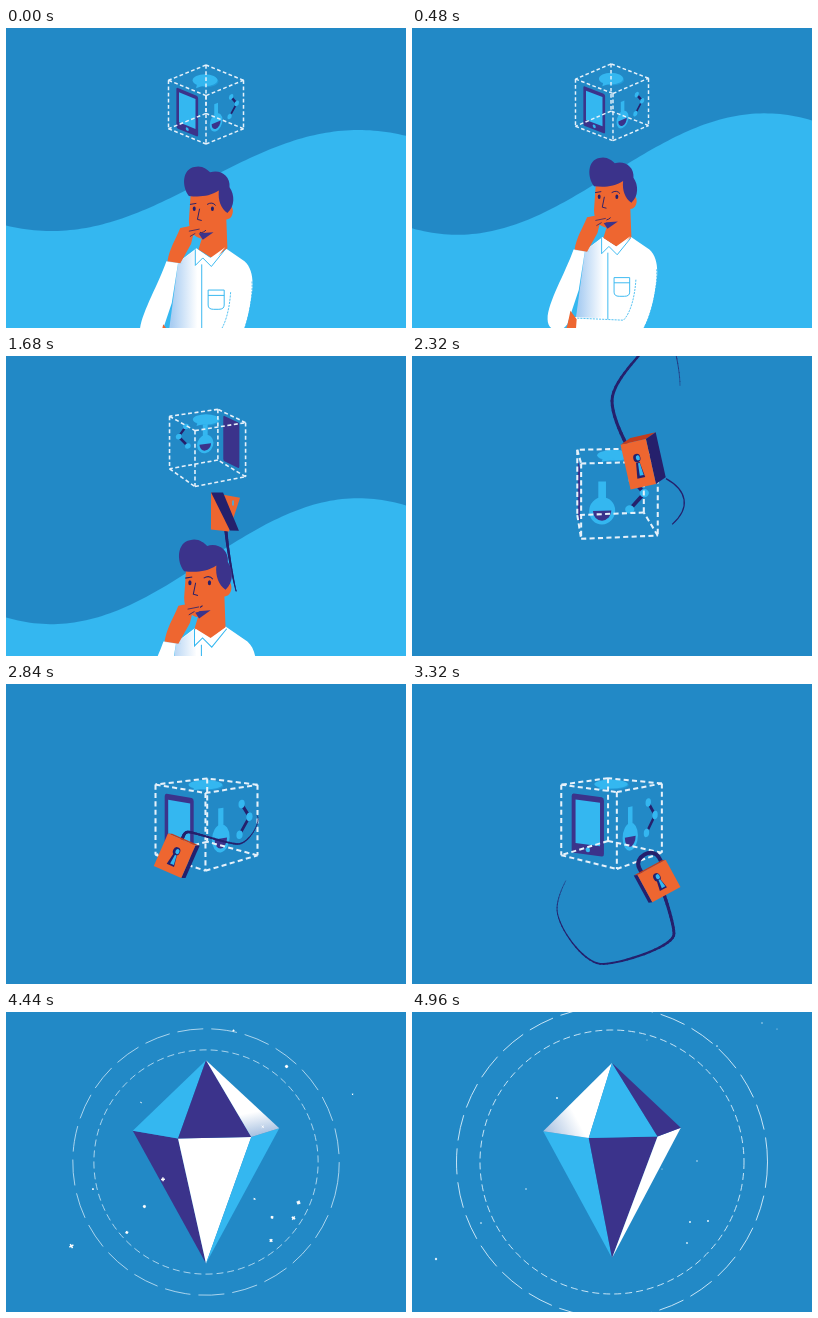
Animation of 400x300 px, one loop 5 s. Source, as an HTML page with a canvas:

```html
<!DOCTYPE html>
<html lang="en">
<head>
<meta charset="utf-8">
<title>Idea in a gem</title>
<style>
html, body { margin: 0; width: 100%; height: 100%; overflow: hidden; background: #2289c6; }
canvas { display: block; width: 400px; height: 300px; }
</style>
</head>
<body>
<canvas id="stage" width="400" height="300"></canvas>
<script>
const ctx = document.getElementById('stage').getContext('2d');
const LOOP = 5000, TAU = Math.PI * 2, RAD = Math.PI / 180;
const BLUE = '#2289c6', CYAN = '#34b7f0', VIOLET = '#3b338b', NAVY = '#25206c',
  ORANGE = '#ee6630', WHITE = '#fff';

// Monotone cubic interpolation through rows of [time, ...values].
function track(t, keys) {
  const last = keys.length - 1;
  if (t <= keys[0][0]) return keys[0].slice(1);
  if (t >= keys[last][0]) return keys[last].slice(1);
  let i = 0;
  while (keys[i + 1][0] < t) i++;
  const slope = (j, c) => (keys[j + 1][c] - keys[j][c]) / (keys[j + 1][0] - keys[j][0]);
  const tangent = (j, c) => {
    if (j === 0 || j === last) return 0;
    const a = slope(j - 1, c), b = slope(j, c);
    return a * b <= 0 ? 0 : 2 * a * b / (a + b);
  };
  const [a, b] = [keys[i], keys[i + 1]], d = b[0] - a[0], u = (t - a[0]) / d, v = 1 - u;
  return a.slice(1).map((p, n) => {
    const c = n + 1;
    return p * (1 + 2 * u) * v * v + tangent(i, c) * d * u * v * v
      + b[c] * u * u * (3 - 2 * u) - tangent(i + 1, c) * d * u * u * v;
  });
}

function poly(points, fill) {
  ctx.beginPath();
  points.forEach(p => ctx.lineTo(p[0], p[1]));
  ctx.closePath();
  ctx.fillStyle = fill;
  ctx.fill();
}
function line(points, color, width) {
  ctx.beginPath();
  points.forEach(p => ctx.lineTo(p[0], p[1]));
  ctx.strokeStyle = color;
  ctx.lineWidth = width;
  ctx.stroke();
}
function ellipse(x, y, rx, ry, fill, from = 0, to = TAU) {
  ctx.beginPath();
  ctx.ellipse(x, y, rx, ry, 0, from, to);
  ctx.fillStyle = fill;
  ctx.fill();
}
function shape(d, fill) {
  ctx.fillStyle = fill;
  ctx.fill(new Path2D(d));
}
function outline(d, color, width, dash = []) {
  ctx.setLineDash(dash);
  ctx.strokeStyle = color;
  ctx.lineWidth = width;
  ctx.stroke(new Path2D(d));
  ctx.setLineDash([]);
}

function wave(t) {
  const [mid, amp] = track(t, [[0, 152.5, 50.5], [1040, 138, 73.5], [1680, 205, 63], [2060, 400, 50]]);
  const points = [[0, 300]];
  for (let x = 0; x <= 400; x += 4) points.push([x, mid - amp * Math.sin((x - 199) * Math.PI / 307)]);
  poly([...points, [400, 300]], CYAN);
}

function man(t) {
  const [zoom, top, tilt, look] = track(t, [
    [0, 1.07, 139, 3, 4], [1040, 1, 119, 0, 0], [1680, 1.15, 184, 0, 2], [2060, 1.25, 350, 0, 2]]);
  ctx.save();
  ctx.translate(200, top);
  ctx.scale(zoom, zoom);
  ctx.translate(-200, -119);

  // Shirt and folded arm
  shape('M174 208L191 195L204 204L217 194L236 207C244 214 245 228 242 243C238 270 229 297 210 298L174 300Z', WHITE);
  const shade = ctx.createLinearGradient(168, 0, 192, 0);
  shade.addColorStop(0, '#a9cdf2');
  shade.addColorStop(1, WHITE);
  shape('M174 208L191 196L193 272L165 275Z', shade);
  shape('M164 272L212 274L224 240L242 240C238 270 228 299 206 298L163 287Z', WHITE);
  outline('M223 236C222 252 218 268 211 275L166 273M243 226C244 246 238 268 231 282', CYAN, .8, [2, 1]);
  outline('M196 210V274M202 234H217V248Q217 252 212 252H207Q202 252 202 248ZM202 239H217', CYAN, .9);

  // Head
  ctx.save();
  ctx.translate(tilt, 0);
  shape('M183 140L181 169C181 180 187 185 193 186L190 196L204 205L217 195L216 168C223 168 224 156 219 155L212 138Z', ORANGE);
  shape('M190 181L204 180L194 187Z', VIOLET);
  shape('M181 146C174 137 175 121 186 119C193 117 198 121 201 124C210 121 220 127 219 138C224 145 224 156 217 162C211 158 208 150 209 141C200 147 190 147 181 146Z', VIOLET);
  ctx.translate(0, look);
  outline('M191 154L189 164L193 165M182 150L188 149M198 150Q203 147 206 151M189 175Q193 178 197 174', NAVY, .9);
  const open = t < 700 || t > 1250;
  [[186, 154], [203, 154]].forEach(([x, y]) => ellipse(x, y, 1.4, open ? 2.2 : .6, NAVY));
  ctx.restore();

  shape('M191 196L189 212L196 204L203 212L218 194L204 204Z', WHITE);
  outline('M190 196L190 211L197 204L205 212L218 196', CYAN, .9);

  // Raised arm
  shape('M163 207C155 230 138 258 138 274C138 286 151 288 157 279L168 246L174 208Z', WHITE);
  outline('M164 207L178 209', '#b9dcf5', 1);
  shape('M157 280L160 266L166 274L165 288L155 286Z', ORANGE);
  shape('M176 176L186 174L195 177L194 181L188 183L186 191L176 209L164 207C166 195 171 188 176 176Z', ORANGE);
  outline('M184 179L194 177M185 184L190 181', NAVY, .7);
  ctx.restore();
}

const CUBE = [
  // time, x, y, radius, yaw, pitch, perspective
  [0, 200, 76.5, 37.5, 0, .42, 0], [1040, 200, 71.5, 35.3, 7, .41, 0],
  [1680, 201, 90, 39.7, 163, .32, .0013], [2320, 203, 134, 51, 322, .26, .002],
  [3000, 200, 136, 51, 363, .21, .002], [3320, 200, 135, 50.5, 365, .21, .002],
  [3920, 200, 142, 42.5, 366, .33, .001]];

function cube(t) {
  const [cx, cy, r, yaw, pitch, depth] = track(t, CUBE);
  const half = r / Math.SQRT2;
  const project = (angle, y, reach = r) => {
    const a = angle * RAD, z = reach * Math.cos(a), p = 1 + z * depth;
    return [cx + reach * Math.sin(a) * p, cy + (y * Math.cos(pitch) + z * Math.sin(pitch)) * p];
  };
  const corner = (i, y) => project(yaw + i * 90, y);
  ctx.globalAlpha = 1 - .5 * Math.min(1, Math.max(0, (t - 3700) / 200));

  // Draws in face coordinates running from -50 to 50.
  const onFace = (i, draw) => {
    const o = project(yaw + i * 90 + 45, 0, half);
    const [a, b, c] = [corner(i, -half), corner(i + 1, -half), corner(i, half)];
    ctx.save();
    ctx.transform((b[0] - a[0]) / 100, (b[1] - a[1]) / 100, (c[0] - a[0]) / 100, (c[1] - a[1]) / 100, o[0], o[1]);
    draw(Math.cos((yaw + i * 90 + 45) * RAD));
    ctx.restore();
  };
  const phone = facing => {
    shape('M-25 -42H25Q29 -42 29 -38V38Q29 42 25 42H-25Q-29 42 -29 38V-38Q-29 -42 -25 -42Z', VIOLET);
    if (facing < .2) return;
    shape('M-22 -34H22V28H-22Z', CYAN);
    ellipse(0, 35, 4, 3.5, CYAN);
  };
  const lab = () => {
    shape('M-28 -25H-18V4H-28Z', CYAN);
    ellipse(-23, 14, 17, 18, CYAN);
    ellipse(-23, 14, 12, 13, VIOLET, 0, Math.PI);
    line([[17, -26], [32, -8], [13, 13]], NAVY, 5);
    [[17, -26], [32, -8], [13, 13]].forEach(([x, y]) => ellipse(x, y, 6, 5.5, CYAN));
  };
  const bubble = () => {
    const [x, y] = project(0, -half, 0), w = r * .33, h = w * Math.sin(pitch) + 1;
    ellipse(x, y + 1, w, h, '#239bd9');
    ellipse(x - 1, y, w, h, CYAN);
    poly([[x - w * .7, y + h * .4], [x - w * .8, y + h * 1.3], [x, y + h * .7]], CYAN);
  };
  const edges = () => {
    ctx.setLineDash([r * .1, r * .065]);
    for (let i = 0; i < 4; i++) {
      [-half, half].forEach(y => line([corner(i, y), corner(i + 1, y)], '#e6f1fa', r * .04));
      line([corner(i, -half), corner(i, half)], '#e6f1fa', r * .04);
    }
    ctx.setLineDash([]);
  };
  bubble();
  onFace(-1, phone);
  onFace(0, lab);
  edges();
  ctx.globalAlpha = 1;
}

const FLIGHT = [
  [1440, 230, 235], [1680, 219, 156], [1800, 262, 90], [1900, 268, 30], [2020, 252, -30],
  [2150, 228, -2], [2230, 200, 45], [2320, 226, 108], [2440, 252, 135], [2560, 232, 160],
  [2700, 182, 148], [2820, 172, 166], [2960, 145, 225], [3080, 190, 280], [3200, 262, 250],
  [3320, 247, 197], [3480, 245, 195], [3760, 202, 165]];

function lock(t) {
  if (t < 1440 || t > 3980) return;
  const [x, y] = track(t, FLIGHT);
  const steps = 60, span = Math.min(420, t - 1440);
  if (t < 3740) {
    ctx.lineCap = 'round';
    for (let i = 0; i < steps; i++) {
      const at = n => track(Math.max(1440, Math.min(t - span * n / steps, 3320)), FLIGHT);
      line([at(i), at(i + 1)], NAVY, .4 + 3.2 * (1 - i / steps));
    }
    ctx.lineCap = 'butt';
  }
  const [rot, w, h, d] = track(t, [
    [1900, .3, 13, 20, 10], [2320, -.22, 13, 23, 11], [2800, .5, 15, 18, 5],
    [3080, -1, 15, 16, -4], [3320, -.5, 16, 15.5, -3.5], [3760, 0, 14, 14, -2]]);
  ctx.save();
  ctx.translate(x, y);
  if (t < 1860) {
    ctx.rotate((t - 1680) * .003);
    poly([[-14, -19], [15, -14], [4, 20], [-14, 18]], ORANGE);
    poly([[-14, -19], [-2, -19], [14, 19], [5, 19]], NAVY);
    line([[8, -11], [8, -6]], CYAN, 1.5);
    ctx.restore();
    return;
  }
  ctx.rotate(rot);
  if (t < 2700) outline('M24 20C42 36 42 54 20 66', NAVY, 1.2);
  if (t > 2900) outline(`M${-w * .7} ${-h}V${-h - 5}C${-w * .7} ${-h - 18} ${w * .7} ${-h - 18} ${w * .7} ${-h - 5}V${-h}`, NAVY, 4);
  const side = Math.sign(d) * w, lift = Math.abs(d) * .4;
  poly([[-w, -h], [w, -h], [w + d, -h - lift], [-w + d, -h - lift]], '#c23c1d');
  poly([[side, -h], [side + d, -h - lift], [side + d, h - lift], [side, h]], NAVY);
  poly([[-w, -h], [w, -h], [w, h], [-w, h]], ORANGE);
  ellipse(0, -h * .28, 3.6, 4.2, NAVY);
  poly([[-1.8, -2], [1.8, -2], [4, h * .6], [-4, h * .6]], NAVY);
  ellipse(1, -h * .28, 2, 2.6, CYAN);
  poly([[0, -1], [1.8, -1], [3, h * .5], [-1, h * .5]], CYAN);
  ctx.restore();
}

function gem(t, inside) {
  const [topY, lowY, r, stretch] = track(t, [
    [3440, -70, 390, 89, .955], [3920, 105, 118, 89, .955], [3990, 118, 118, 88, .96],
    [4500, 117.5, 117.5, 73, .99], [4960, 117.5, 117.5, 70, 1]]);
  const spin = t < 3920 ? track(t, [[3440, -60], [3920, 0]])[0]
    : 221 * (1 - Math.pow(1 - Math.min(1, (t - 3920) / 1080), 1.9));
  const rim = (i, y) => {
    const a = (spin + i * 60) * RAD;
    return [200 + r * Math.sin(a), y + r * .13 * Math.cos(a)];
  };
  const sides = [0, 1, 2, 3, 4, 5];
  const half = (y, tipY, colors) => sides.forEach(i => {
    const a = rim(i, y), b = rim(i + 1, y);
    const cross = (b[0] - a[0]) * (tipY - a[1]) - (b[1] - a[1]) * (tipY < y ? 200 - a[0] : a[0] - 200) * (tipY < y ? 1 : -1);
    if (tipY < y ? cross >= 0 : cross <= 0) return;
    let fill = colors[i % 3];
    if (fill === WHITE && tipY < y) {
      fill = ctx.createLinearGradient(a[0], a[1], (b[0] + 200) / 2, (b[1] + tipY) / 2);
      fill.addColorStop(0, '#a5bfe0');
      fill.addColorStop(.55, WHITE);
    }
    poly([a, b, [200, tipY]], fill);
  });
  if (t > 3440 && t < 4000) poly(sides.map(i => rim(i, lowY)), NAVY);
  inside();
  if (t < 3440) return;
  half(lowY, lowY + 1.836 * r * stretch, [WHITE, CYAN, VIOLET]);
  half(topY, topY - .95 * r * stretch, [VIOLET, WHITE, CYAN]);
}

function burst(t) {
  if (t < 3760 || t > 4140) return;
  const [inner, outer] = track(t, [[3760, 30, 30], [3920, 71, 116], [4140, 165, 165]]);
  for (let i = 0; i < 16; i++) {
    const a = i * TAU / 16, c = Math.cos(a), s = Math.sin(a);
    line([[200 + inner * c, 150 + inner * s], [200 + outer * c, 150 + outer * s]], '#d9ecf8', 1);
  }
}

function rings(t) {
  if (t < 4080) return;
  const [near, far, alpha] = track(t, [[4080, 50, 60, 0], [4500, 118, 140, .8], [4960, 132, 155.5, .9]]);
  const turn = (t - 4960) * .0003;
  ctx.globalAlpha = alpha;
  ctx.strokeStyle = '#d9eefa';
  ctx.lineWidth = 1;
  [[near, [7, 4], turn], [far, [26, 8], -turn]].forEach(([r, dash, start]) => {
    ctx.setLineDash(dash);
    ctx.beginPath();
    ctx.arc(200, 150, r, start, start + TAU);
    ctx.stroke();
  });
  ctx.setLineDash([]);
  ctx.globalAlpha = 1;
}

// Each spark drifts from one point to another: x, y, x, y, size.
const SPARKS = [
  [256, 75, 305, 34, 2.4], [289, 172, 296, 209, 3], [297, 202, 278, 210, 3], [255, 226, 275, 231, 2.6],
  [247, 262, 285, 149, 2.2], [107, 221, 24, 247, 3.4], [163, 212, 114, 177, 2.3], [173, 230, 69, 211, 2.2],
  [169, 249, 145, 86, 2.8], [220, 9, 235, 28, 1.5], [105, 143, 69, 211, 1.3], [328, 148, 365, 17, 1],
  [247, 217, 250, 157, 1.6], [125, 95, 145, 86, .8], [163, 219, 350, 11, 2]];

function sparks(t) {
  if (t < 3780) return;
  const [grow] = track(t, [[3780, 0], [3920, 1], [4500, .65], [4960, .35]]);
  const [drift] = track(t, [[3920, 0], [4960, 1]]);
  const [out] = track(t, [[3780, .4], [3920, 1]]);
  SPARKS.forEach(([x0, y0, x1, y1, size], i) => {
    const x = 200 + (x0 - 200) * out + (x1 - x0) * drift;
    const y = 150 + (y0 - 150) * out + (y1 - y0) * drift, s = size * grow;
    if (drift > .6) return ellipse(x, y, Math.max(.5, s), Math.max(.5, s), '#d9eefa');
    const a = .3 + i * .15, c = s * Math.cos(a), n = s * Math.sin(a);
    line([[x - c, y - n], [x + c, y + n]], WHITE, size > 2 ? 1.5 : 1);
    line([[x + n, y - c], [x - n, y + c]], WHITE, size > 2 ? 1.5 : 1);
  });
}

function frame(now) {
  const t = now % LOOP;
  ctx.fillStyle = BLUE;
  ctx.fillRect(0, 0, 400, 300);
  if (t < 2200) wave(t);
  burst(t);
  rings(t);
  gem(t, () => {
    if (t < 4000) cube(t);
    lock(t);
  });
  sparks(t);
  if (t < 2200) man(t);
}

const start = performance.now();
function tick() {
  frame(performance.now() - start);
  requestAnimationFrame(tick);
}
tick();
</script>
</body>
</html>
```
